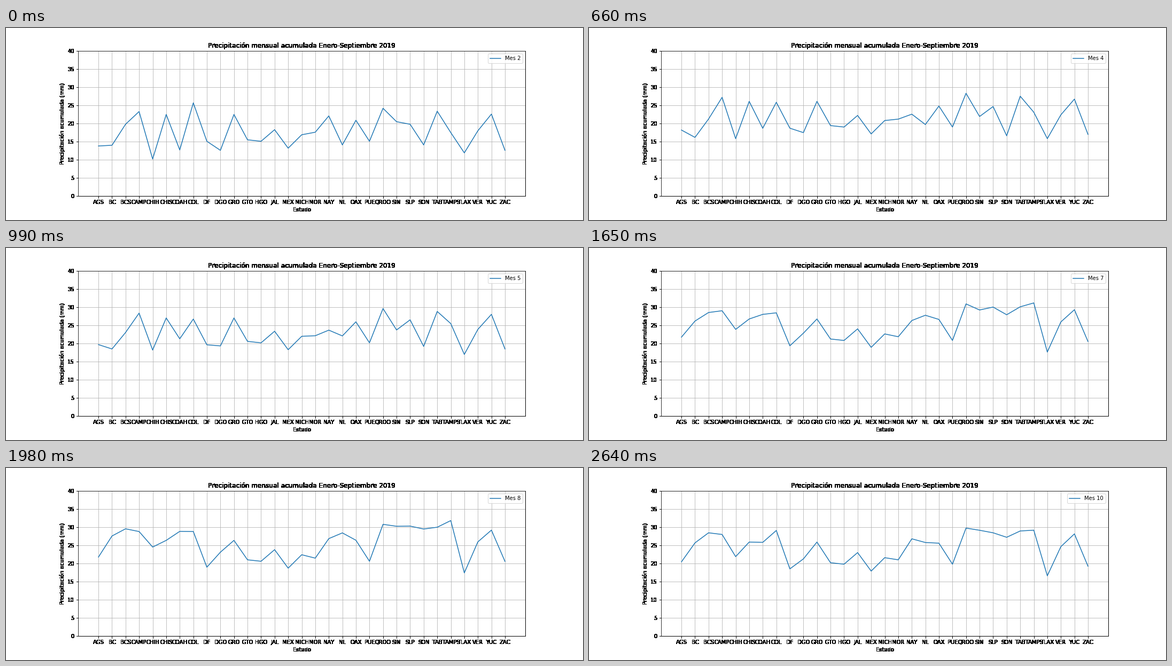
Recreate the animation shown at these times as a matplotlib script. Size 1080x360 px, loop 2970 ms.

```python
import matplotlib.pyplot as plt
import numpy as np
from matplotlib.animation import FuncAnimation

plt.rcParams["font.family"] = "DejaVu Sans"
plt.rcParams["text.kerning_factor"] = 6  # whole-pixel kerning

STATES = ("AGS BC BCS CAMP CHIH CHIS COAH COL DF DGO GRO GTO HGO JAL MEX MICH "
          "MOR NAY NL OAX PUE QROO SIN SLP SON TAB TAMPS TLAX VER YUC ZAC").split()
MONTHS = range(2, 11)
STEP_MS = 330

# Level of each state in the first month shown.
START = np.array([13.8, 14.0, 19.8, 23.3, 10.2, 22.5, 12.7, 25.7, 15.1, 12.6, 22.5,
                  15.5, 15.1, 18.3, 13.2, 16.9, 17.6, 22.1, 14.1, 20.9, 15.1, 24.2,
                  20.5, 19.8, 14.1, 23.4, 17.5, 11.9, 18.0, 22.6, 12.6])

# Climate groups by their rise up to month 9; all others rise by MILD.
MILD = 5.3
RISES = {17: "COAH SON", 15: "BC CHIH NL TAMPS", 10.8: "BCS DGO SIN SLP",
         8: "AGS VER ZAC", 6.5: "QROO TAB YUC", 3.5: "CHIS COL DF GRO MOR"}
GROUP = {state: rise for rise, names in RISES.items() for state in names.split()}
RISE = np.array([GROUP.get(state, MILD) for state in STATES])
COAST = np.isin(STATES, "BC BCS COL NAY SIN SON".split())

# The season: share of the rise, spring warmth, and the lag of the Pacific coast.
KEYS = [2, 3, 5, 7, 9, 10]
SHARE = [0, 0.05, 0.3, 0.82, 1, 0.72]
SPRING = [0, 2.5, 3.5, 1.4, 0, 0.9]
LAG = [0, 3.4, 3.5, 1.5, 0, 0]


def levels(month):
    share, spring, lag = (np.interp(month, KEYS, k) for k in (SHARE, SPRING, LAG))
    return START + RISE * share + spring - COAST * lag


def harden(img, dpi):
    """Turn every touched pixel solid black."""
    img[..., :3] = 0
    img[..., 3] = img[..., 3] > 0
    return img, 0, 0


fig, ax = plt.subplots(figsize=(15, 5), dpi=72, facecolor="white")
fig.subplots_adjust(left=0.125, right=0.9, bottom=0.125, top=0.88)

x = np.arange(len(STATES))
line, = ax.plot(x, START, color="#1f77b4", lw=1.5, label="Mes 2")
ax.set_xticks(x, STATES)
ax.set_yticks(range(0, 41, 5))
ax.set_ylim(0, 40)
ax.grid(True)
ax.set_title("Precipitación mensual acumulada Enero-Septiembre 2019")
ax.set_xlabel("Estado")
ax.set_ylabel("Precipitación acumulada (mm)")
label = ax.legend(loc="upper right").get_texts()[0]

hard = [ax.title, ax.xaxis.label, ax.yaxis.label, ax.spines["right"], ax.spines["bottom"]]
for axis in (ax.xaxis, ax.yaxis):
    for tick in axis.get_major_ticks():
        hard += [tick.label1, tick.tick1line]
for artist in hard:
    artist.set_agg_filter(harden)


def update(i):
    line.set_ydata(levels(MONTHS[i]))
    label.set_text(f"Mes {MONTHS[i]}")
    return line, label


anim = FuncAnimation(fig, update, frames=len(MONTHS), interval=STEP_MS,
                     repeat=True, repeat_delay=0, blit=False)
plt.show()
```
